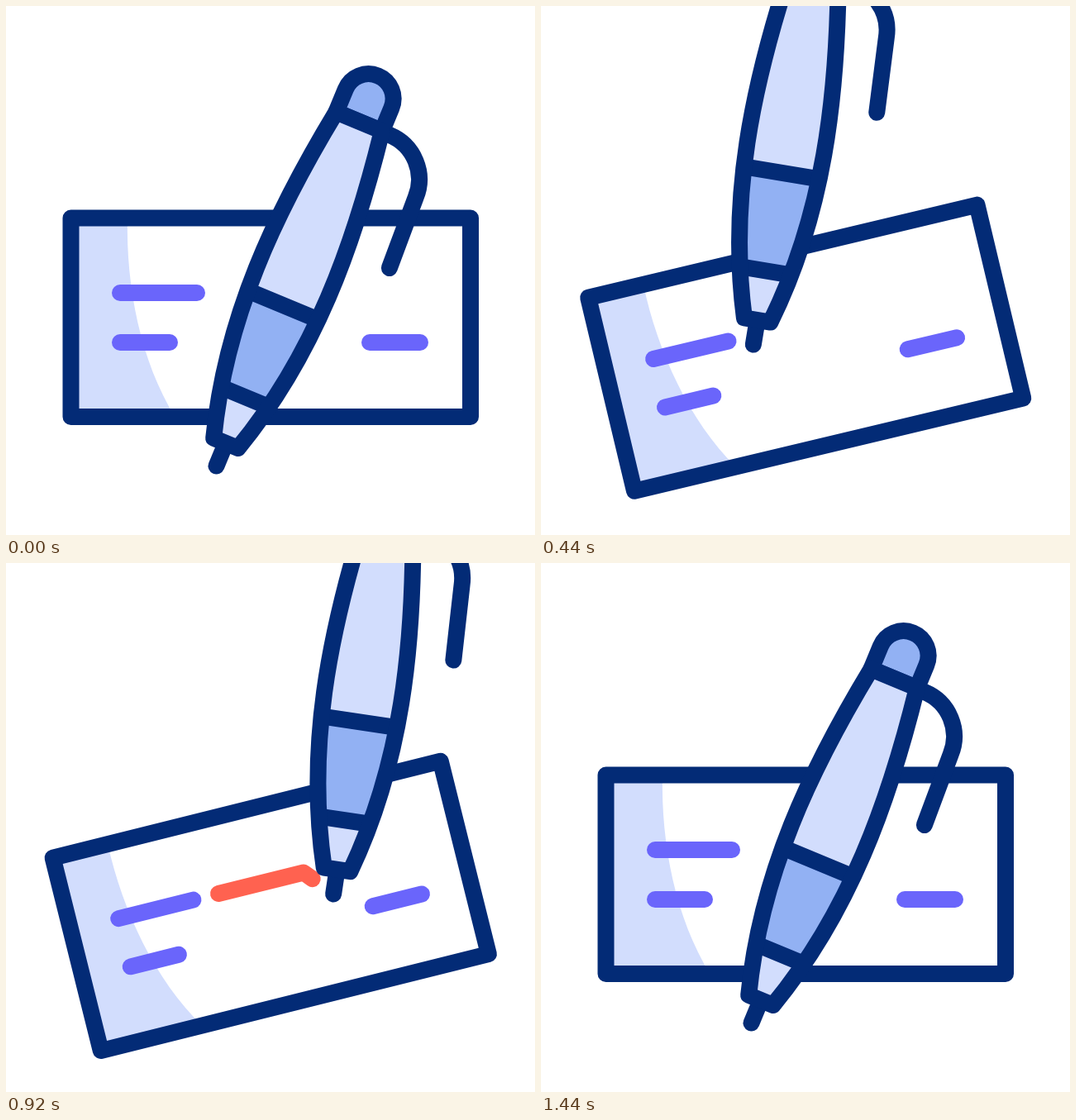
Write an HTML page with a canvas that moves like this. It is 640x640 px and loops after 1.48 s.

```html
<!DOCTYPE html>
<html lang="en">
<head>
<meta charset="utf-8">
<title>Signing a check</title>
<style>
  html, body { margin: 0; width: 100%; height: 100%; overflow: hidden; background: #fff; }
  canvas { display: block; width: 640px; height: 640px; }
</style>
</head>
<body>
<canvas id="stage" width="640" height="640"></canvas>
<script>
const ctx = document.getElementById('stage').getContext('2d');
const LOOP = 1480, STEP = 40;
const NAVY = '#032b76', LIGHT = '#d2ddfd', BLUE = '#92b1f3', PURPLE = '#6a65fb', RED = '#ff6250';
const RAD = Math.PI / 180;

// Pen tip stations
const REST = [254.5, 556.5], START = [257, 400], CORNER = [360, 374.5], END = [418.7, 416.8];

const lerp = (a, b, p) => a + (b - a) * p;
const mix = (a, b, p) => [lerp(a[0], b[0], p), lerp(a[1], b[1], p)];
const progress = (t, from, to) => Math.min(1, Math.max(0, (t - from) / (to - from)));
const smooth = (t, from, to) => {
  const u = progress(t, from, to);
  return u * u * (3 - 2 * u);
};

// Cubic ease (.45, 0, .38, 1), solved by bisection
function swing(t, from, to) {
  const u = progress(t, from, to);
  if (u === 0 || u === 1) return u;
  let lo = 0, hi = 1, s = 0.5;
  for (let i = 0; i < 24; i++) {
    const q = 1 - s;
    const x = 3 * 0.45 * s * q * q + 3 * 0.38 * s * s * q + s * s * s;
    if (x < u) lo = s; else hi = s;
    s = (lo + hi) / 2;
  }
  return s * s * (3 - 2 * s);
}

function stroke(color) {
  ctx.strokeStyle = color;
  ctx.stroke();
}

function line(color, ...points) {
  ctx.beginPath();
  points.forEach(p => ctx.lineTo(p[0], p[1]));
  stroke(color);
}

function drawCard(angle, drop) {
  ctx.save();
  ctx.translate(320, 376.75 + drop);
  ctx.rotate(angle);
  ctx.translate(-320, -376.75);

  ctx.beginPath();
  ctx.moveTo(78.5, 256.5);
  ctx.lineTo(147, 256.5);
  ctx.bezierCurveTo(145, 340, 163, 430, 204.5, 497);
  ctx.lineTo(78.5, 497);
  ctx.fillStyle = LIGHT;
  ctx.fill();

  ctx.beginPath();
  ctx.rect(78.5, 256.5, 483.5, 240.5);
  stroke(NAVY);

  line(PURPLE, [138, 347], [231, 347]);
  line(PURPLE, [138, 407], [198, 407]);
  line(PURPLE, [440, 407], [501, 407]);
  ctx.restore();
}

function bodyPath() {
  ctx.beginPath();
  ctx.moveTo(-16, -30);
  ctx.bezierCurveTo(-58.5, -170, -51.5, -310, -30, -451);
  ctx.lineTo(30, -451);
  ctx.bezierCurveTo(51.5, -310, 58.5, -170, 16, -30);
  ctx.closePath();
}

// Drawn upright, with the tip at the origin
function drawPen(tip, angle) {
  ctx.save();
  ctx.translate(tip[0], tip[1]);
  ctx.rotate(angle);

  line(NAVY, [0, 0], [0, -30]);

  ctx.beginPath();
  ctx.moveTo(30, -450.2);
  ctx.arc(40.3, -392, 58.2, -Math.PI / 2, 0);
  ctx.lineTo(101.8, -301.3);
  stroke(NAVY);

  ctx.beginPath();
  ctx.moveTo(-30, -451);
  ctx.lineTo(-30, -481);
  ctx.arc(0, -481, 30, Math.PI, 0);
  ctx.lineTo(30, -451);
  ctx.closePath();
  ctx.fillStyle = BLUE;
  ctx.fill();
  stroke(NAVY);

  ctx.save();
  bodyPath();
  ctx.fillStyle = LIGHT;
  ctx.fill();
  ctx.clip();
  ctx.fillStyle = BLUE;
  ctx.fillRect(-60, -210.6, 120, 120.2);
  line(NAVY, [-60, -210.6], [60, -210.6]);
  line(NAVY, [-60, -90.4], [60, -90.4]);
  ctx.restore();
  bodyPath();
  stroke(NAVY);
  ctx.restore();
}

function drawSignature(t) {
  if (t <= 560 || t >= 1240) return;
  const points = [START, mix(START, CORNER, smooth(t, 560, 704))];
  const tail = smooth(t, 860, 1080);
  if (tail > 0) points.push(mix(CORNER, END, tail));
  line(RED, ...points);
}

function tipAt(t) {
  if (t < 560) return mix(REST, START, swing(t, 131, 536));
  if (t < 740) return mix(START, CORNER, smooth(t, 560, 713));
  if (t < 1200) return mix(CORNER, END, smooth(t, 760, 1037));
  return mix(END, REST, swing(t, 1200, 1411));
}

function render(t) {
  ctx.fillStyle = '#fff';
  ctx.fillRect(0, 0, 640, 640);
  ctx.lineWidth = 20;
  ctx.lineCap = ctx.lineJoin = 'round';

  const turn = swing(t, 120, 520) - swing(t, 1200, 1408);
  const sink = swing(t, 120, 508) - swing(t, 1200, 1393);
  const penTurn = swing(t, 131, 536) - swing(t, 1200, 1413);

  drawCard(-14 * RAD * turn, 38.2 * sink);
  drawSignature(t);
  drawPen(tipAt(t), (22.5 - 14 * penTurn) * RAD);
}

const began = performance.now();
function tick() {
  const t = (performance.now() - began) % LOOP;
  render(Math.floor(t / STEP) * STEP);
  requestAnimationFrame(tick);
}
tick();
</script>
</body>
</html>
```
